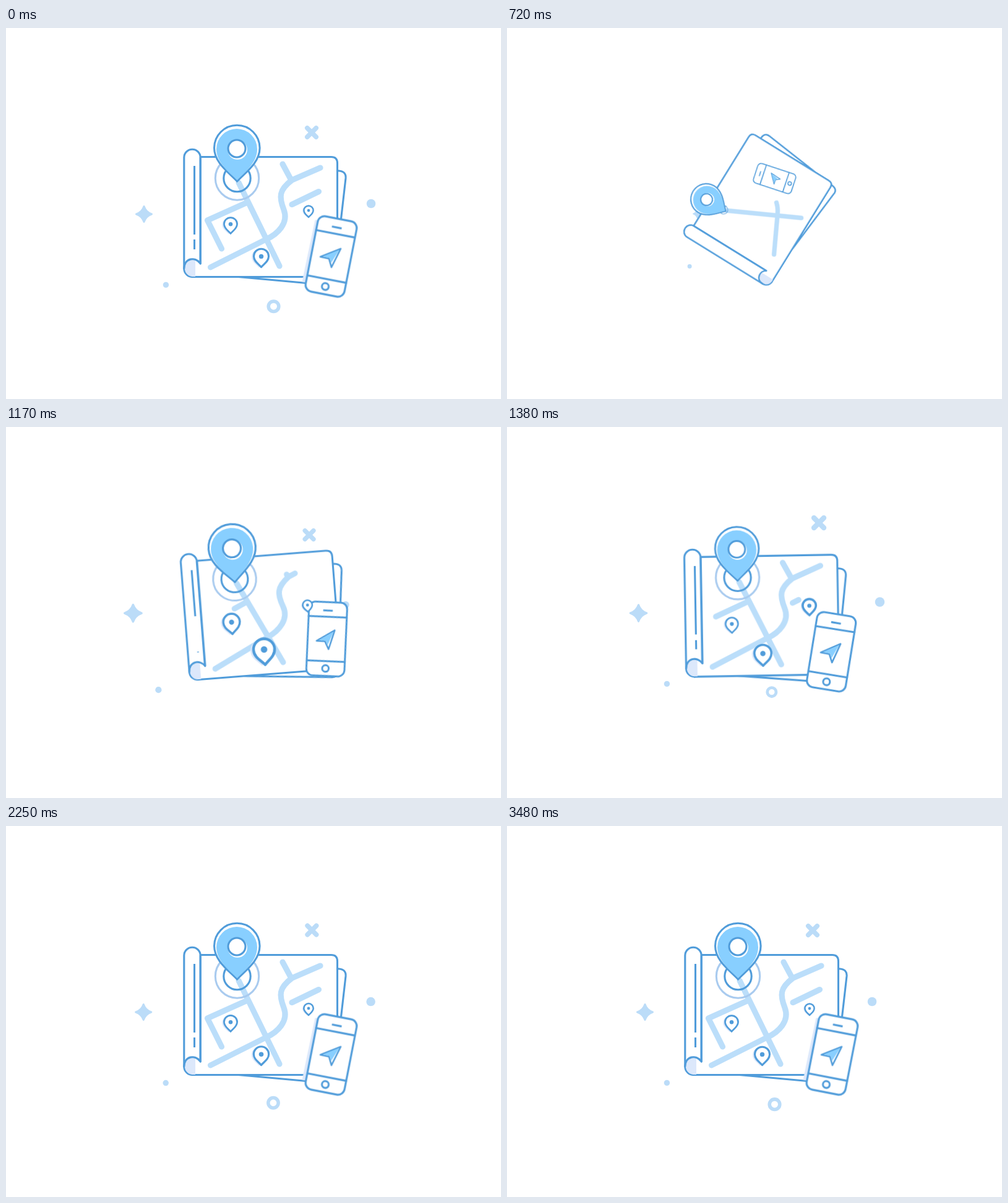
These frames come from a looping animation (800 by 600 pixels, 3510 ms). An HTML page without scripts:

```html
<!DOCTYPE html>
<html lang="en">
<head>
<meta charset="utf-8">
<title>Map and phone</title>
<style>
  /* shared clock in milliseconds; every timing below is read from it */
  @property --t { syntax: "<number>"; inherits: true; initial-value: 3510; }
  @keyframes clock { from { --t: 30; } to { --t: 3540; } }

  html, body { margin: 0; width: 100%; height: 100%; overflow: hidden; background: #fff; }
  svg {
    display: block; width: 800px; height: 600px;
    fill: none; stroke-linecap: round; stroke-linejoin: round;
    animation: clock 3510ms linear -3480ms infinite;
  }

  .line { stroke: #509cda; stroke-width: 3.1; }
  .paper { fill: #fff; }
  .shade { fill: #dce8fb; stroke: none; }
  .blue { fill: #88cfff; stroke: none; }
  .ink { fill: #509cda; stroke: none; }
  .halo { stroke: #a9cbef; }
  .road { stroke: #bbdefa; stroke-width: 9.2; }

  /* linear growth for --d ms up to time --c, then a damped swing of size --a */
  .pop {
    --u: calc(var(--t) - var(--c));
    --after: max(0, var(--u));
    transform: scale(calc(max(0, 1 + min(0, var(--u)) / var(--d))
      + var(--a) * exp(-.0032 * var(--after)) * sin(.00654 * var(--after))));
  }
  .decor { --a: .206; --d: 690; transform-origin: 400px 300px; }
  .decor .fill { fill: #bbdcf8; }
  .decor .open { stroke: #bbdcf8; }
  .pin { --a: .85; --d: 130; }
  .ring { --a: 0; --d: 340; }

  /* line drawn from time --s for --d ms, eased in by the power --e */
  .draw {
    --e: 1;
    stroke-dasharray: 1 3;
    stroke-dashoffset: calc(1.05 * (1 - pow(clamp(0, (var(--t) - var(--s)) / var(--d), 1), var(--e))));
  }

  .map { transform-origin: 400px 300px; animation: unfold 3510ms -3480ms infinite; }
  @keyframes unfold {
    0%, 1.71% { transform: rotate(-275deg) scale(0); animation-timing-function: cubic-bezier(.5, 0, .8, .45); }
    12.82% { transform: rotate(-193deg) scale(.31); animation-timing-function: cubic-bezier(.3, .45, .6, .93); }
    24.79% { transform: rotate(-15.5deg) scale(.956); animation-timing-function: cubic-bezier(.25, .44, .65, .82); }
    32.48% { transform: rotate(-4.5deg) scale(.988); animation-timing-function: cubic-bezier(.3, .54, .6, 1); }
    43.59%, 100% { transform: rotate(0deg) scale(1); }
  }

  .phone { animation: slide 3510ms -3480ms infinite; }
  @keyframes slide {
    0%, 13.68% { transform: translate(-80px, -130px) rotate(-45deg) scale(0); animation-timing-function: cubic-bezier(.2, .4, .6, .85); }
    24.79% { transform: translate(-29px, -48px) rotate(-15.8deg) scale(.92); animation-timing-function: cubic-bezier(.25, .44, .65, .82); }
    32.48% { transform: translate(-9.5px, -17px) rotate(-4deg) scale(.975); animation-timing-function: cubic-bezier(.3, .54, .6, 1); }
    43.59%, 100% { transform: translate(0px, 0px) rotate(0deg) scale(1); }
  }
  .cast { transform: translateX(calc(8px * (1 - clamp(0, (var(--t) - 1600) / 260, 1)))); }
</style>
</head>
<body>
<svg viewBox="0 0 800 600">
  <defs>
    <g id="marker">
      <path class="shade" transform="translate(-3.5 1)" d="M0 0C-4-5-12-9-12-17.5A12 12 0 0 1 12-17.5C12-9 4-5 0 0Z"/>
      <path class="paper" d="M0 0C-4-5-12-9-12-17.5A12 12 0 0 1 12-17.5C12-9 4-5 0 0Z"/>
      <circle class="ink" cy="-17.3" r="3.7"/>
    </g>
  </defs>

  <g class="decor pop" style="--c:900"><circle class="fill" cx="258.4" cy="415.4" r="4.7"/></g>
  <g class="decor pop" style="--c:1050">
    <path class="fill open" stroke-width="3" transform="translate(223 301)"
      d="M0-12.5Q3.2-3.2 12.5 0Q3.2 3.2 0 12.5Q-3.2 3.2-12.5 0Q-3.2-3.2 0-12.5Z"/>
  </g>
  <g class="decor pop" style="--c:1200">
    <path class="open" stroke-width="7.6" d="M486.8 161.8l14.4 14.4m0-14.4l-14.4 14.4"/>
  </g>
  <g class="decor pop" style="--c:1320"><circle class="fill" cx="590" cy="284" r="7.3"/></g>
  <g class="decor pop" style="--c:1480"><circle class="open" cx="432.5" cy="450.2" r="8.3" stroke-width="5.6"/></g>

  <g class="map line">
    <path class="paper" d="M500 228L538 231Q550 232 549 243L530.5 405Q529 417 518 415.5L370 402"/>
    <path class="paper" d="M301 208.5H525.5Q535.5 208.5 535.5 218.5V392.5Q535.5 402.5 525.5 402.5H301Z"/>

    <path class="paper" d="M301.5 402.5A13.5 13.5 0 0 1 287.8 389V209.5A13.2 13.2 0 0 1 314.2 209.5V381"/>
    <path class="shade" d="M306 374.5V402H301A13 13 0 0 1 289 389Q290 375 306 374.5Z"/>
    <path d="M287.8 389C288 372 306 369 314.2 381V209.5"/>
    <path class="draw" pathLength="1" stroke-linecap="butt" style="--s:725;--d:640" d="M304.5 223V334"/>
    <path class="draw" pathLength="1" stroke-linecap="butt" style="--s:1140;--d:260" d="M304.5 358V342"/>

    <g class="road">
      <path class="draw" pathLength="1" style="--s:300;--d:360" d="M442 385L376 250"/>
      <path class="draw" pathLength="1" style="--s:390;--d:420" d="M420 342L330.5 387"/>
      <path class="draw" pathLength="1" style="--s:350;--d:950;--e:1.7" d="M420 342C440 333 457 315 449 294S441 262 462 246L508 226"/>
      <path class="draw" pathLength="1" style="--s:1000;--d:765" d="M390 282L325.5 311L348.5 357"/>
      <path class="draw" pathLength="1" style="--s:1130;--d:220" d="M461 246L447 220"/>
      <path class="draw" pathLength="1" style="--s:1250;--d:500" d="M462 285.5L505.5 264.5"/>
    </g>

    <g transform="translate(373.5 243)">
      <circle class="ring pop halo" style="--c:995" r="35.2"/>
      <circle class="ring pop" style="--c:925" r="21.7"/>
    </g>

    <g transform="translate(373.5 248)">
      <g class="pop" style="--c:766;--d:300;--a:.36">
        <path class="paper" d="M0 0C-13-14-37-30-37-54A36.6 36.6 0 0 1 36.6-54C36.6-30 13-14 0 0Z"/>
        <path class="blue" d="M0-2C-12-14-33.5-30-33.5-52A33 33 0 0 1 32.5-52C32.5-30 12-14 0-2Z"/>
        <circle cx=".6" cy="-51" r="15.8" fill="#fff" stroke="none"/>
        <circle class="paper" cx="-.5" cy="-53" r="14"/>
      </g>
    </g>

    <g transform="translate(525.5 369.5)">
      <g class="phone">
        <path class="shade cast" d="M-26-59L-6-59L-26 44L-47 41Z"/>
        <g transform="rotate(11)">
          <rect class="paper" x="-32" y="-62" width="64" height="124" rx="11"/>
          <path d="M-32-37.4H32M-32 37.2H32"/>
          <path stroke-linecap="butt" d="M-8-47.8H8"/>
          <circle cy="49.5" r="5.5"/>
          <path class="paper" stroke-width="2.6" d="M12.8-15.2L-17 3.8L-2.8 4.1L3.8 17.1Z"/>
          <path class="blue" d="M11-13L-13.5 2.7L-1.8 3L2 10Z"/>
        </g>
      </g>
    </g>

    <g transform="translate(363 332.5) scale(.88)">
      <g class="pin pop" style="--c:860"><use href="#marker"/></g>
    </g>
    <g transform="translate(412.5 386.7)">
      <g class="pin pop" style="--c:1000"><use href="#marker"/></g>
    </g>
    <g transform="translate(489 306) scale(.63)" stroke-width="4">
      <g class="pin pop" style="--c:1165"><use href="#marker"/></g>
    </g>
  </g>
</svg>
</body>
</html>
```
